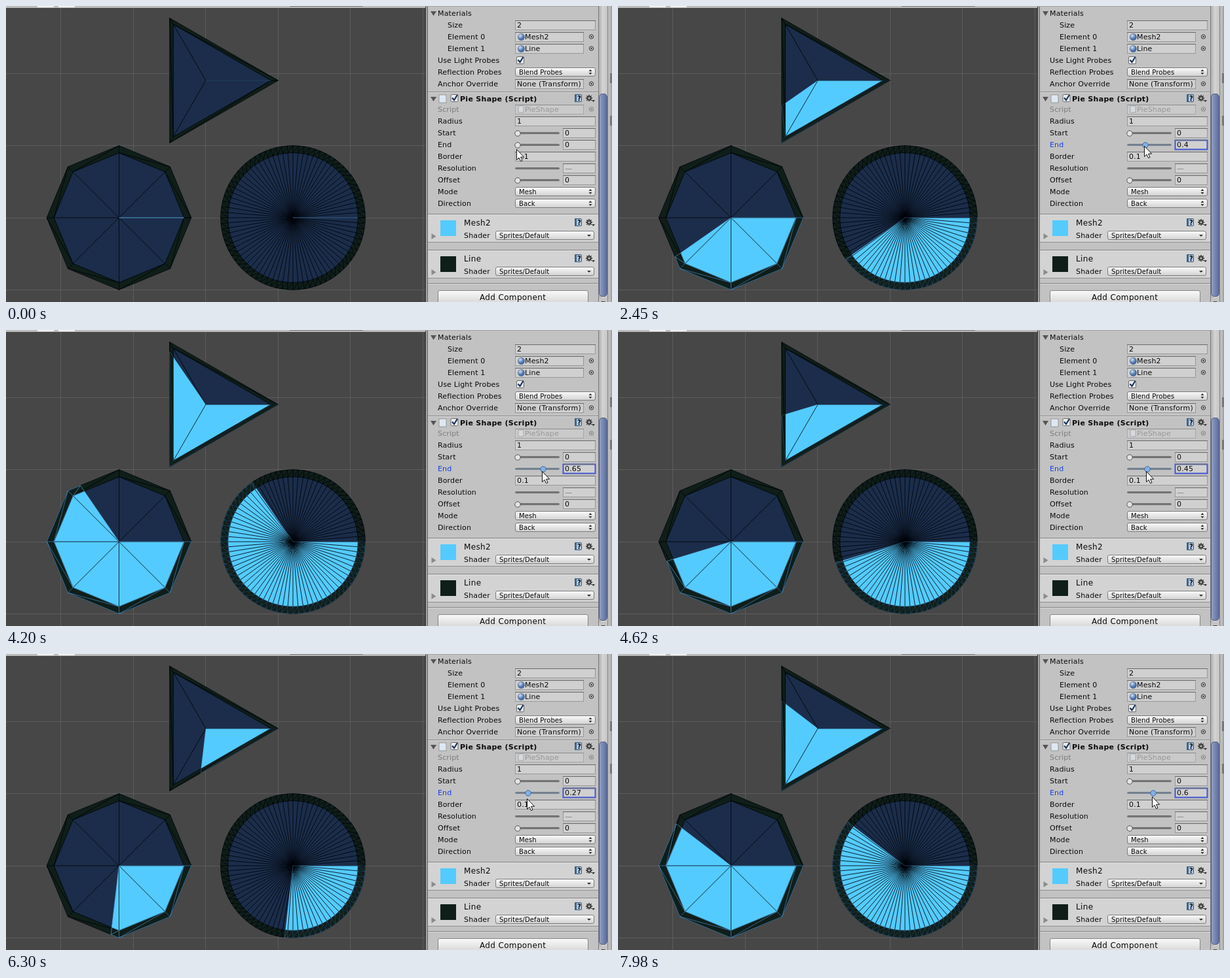
These frames come from a looping animation (925 by 453 pixels, 8 s). An HTML page with a canvas:

```html
<!DOCTYPE html>
<html lang="en">
<head>
<meta charset="utf-8">
<title>Pie shape inspector</title>
<style>
html, body { margin: 0; width: 100%; height: 100%; overflow: hidden; background: #c2c2c2; }
canvas, svg { position: absolute; left: 0; top: 0; display: block; }
text { font: 11px "DejaVu Sans", sans-serif; letter-spacing: .15px; fill: #0a0a0a; white-space: pre; }
.big { font-size: 12px; letter-spacing: .35px; }
.small { font-size: 10px; letter-spacing: .1px; }
.bold { font-weight: bold; letter-spacing: .3px; }
.dim { fill: #7c7c7c; }
</style>
</head>
<body>
<canvas id="view" width="641" height="453"></canvas>
<svg id="ui" width="925" height="453" viewBox="0 0 925 453">
  <defs>
    <linearGradient id="pop" x2="0" y2="1"><stop stop-color="#fafafa"/><stop offset="1" stop-color="#d2d2d2"/></linearGradient>
    <linearGradient id="thumb"><stop stop-color="#94a3c8"/><stop offset=".5" stop-color="#7585b0"/><stop offset="1" stop-color="#5d6c98"/></linearGradient>
    <linearGradient id="track"><stop stop-color="#a8a8a8"/><stop offset=".5" stop-color="#d4d4d4"/><stop offset="1" stop-color="#c4c4c4"/></linearGradient>
    <radialGradient id="ball" cx=".35" cy=".3"><stop stop-color="#d4e4fa"/><stop offset="1" stop-color="#4b70a6"/></radialGradient>
  </defs>
  <g id="panel"></g>
  <path id="pointer" d="M.5 .5V16.5L4 13.2L6.6 18.6L9 17.6L6.6 12.2H11.6Z" fill="#fff" stroke="#111"/>
</svg>
<script>
const LOOP = 8000, STEP = 70, TAU = Math.PI * 2;
const LIT = '#54cbff', FILL = '#1b2d4a', EDGE = '#0f1e19';
const TRAVEL = 59.6; // slider length in pixels

// start time, pointer y, then slider pixels, one per step
const runs = [
  [0, 219, 0], [70, 217, 0], [210, 216, 0], [560, 215, 0],
  [980, 215, 0, 1],
  [1260, 215, 2, 2, 3],
  [1540, 215, 4, 6, 7, 9, 10, 12, 13, 15, 16, 18, 19, 20],
  [2380, 214, 22, 24, 27, 30, 33, 36, 39, 42, 44, 46, 47],
  [3430, 215, 46, 45, 44, 43, 42, 41, 41],
  [4200, 216, 39, 37, 35, 33, 31, 29, 27, 25, 23, 21, 20, 19],
  [5040, 218, 18, 17, 15, 14, 12, 11, 10],
  [5950, 221, 11, 12, 13, 14, 15, 16, 17, 18, 20, 21],
  [6720, 220, 22, 24, 25, 27, 28],
  [7140, 220, 29],
  [7350, 219, 31, 32, 33],
  [7980, 218, 36]
];

const shapes = [
  { x: 305, y: 114, sides: 3, wire: .2 },
  { x: 172.5, y: 324, sides: 8, wire: .6 },
  { x: 438, y: 324, sides: 80, wire: .3 }
];
const RADIUS = 110.3, INNER = .9;

/* ---------- viewport ---------- */
const g = document.getElementById('view').getContext('2d');

function rim(s, f, scale) {
  const seg = TAU / s.sides, a = f * TAU;
  const off = a - Math.floor(a / seg + 1e-9) * seg - seg / 2;
  const r = RADIUS * scale * Math.cos(seg / 2) / Math.cos(off);
  return [s.x + r * Math.cos(a), s.y + r * Math.sin(a)];
}

// corner fractions from 0 up to the end, closing on a partial segment
function corners(s, end) {
  const list = [];
  for (let i = 0; i / s.sides < end - 1e-9; i++) list.push(i / s.sides);
  list.push(end);
  return list;
}

function poly(points, color) {
  g.beginPath();
  points.forEach(p => g.lineTo(...p));
  g.closePath();
  g.fillStyle = color;
  g.fill();
}

function line(...points) {
  points.forEach((p, i) => i ? g.lineTo(...p) : g.moveTo(...p));
}

function stroke(color) {
  g.strokeStyle = color;
  g.lineWidth = 1;
  g.stroke();
}

// the border strip, two triangles per segment
function strip(s, list, color) {
  g.beginPath();
  list.forEach((f, i) => {
    const a = rim(s, f, INNER), b = rim(s, f, 1);
    line(a, b);
    if (i + 1 < list.length) {
      const n = list[i + 1], d = rim(s, n, 1);
      line(rim(s, n, INNER), a, d, b);
    }
  });
  stroke(color);
}

function spokes(s, list, color) {
  g.beginPath();
  list.forEach(f => line([s.x, s.y], rim(s, f, INNER)));
  stroke(color);
}

function pie(s, end) {
  const all = corners(s, 1), part = corners(s, end), blue = `rgba(95,175,235,${s.wire})`;
  poly(all.map(f => rim(s, f, 1)), EDGE);
  poly(all.map(f => rim(s, f, INNER)), FILL);
  if (end > 0) poly([[s.x, s.y], ...part.map(f => rim(s, f, INNER))], LIT);
  strip(s, all, 'rgba(0,4,10,.85)');
  spokes(s, all.slice(1), 'rgba(0,4,10,.85)');
  if (end > 0) {
    strip(s, part, blue);
    spokes(s, part, `rgba(95,175,235,${s.wire / s.sides})`);
  }
  spokes(s, [0, end], blue);
}

function drawView(end) {
  g.fillStyle = '#474747';
  g.fillRect(0, 0, 641, 453);
  g.fillStyle = '#5c5c5c';
  for (let i = 0; i < 6; i++) g.fillRect(Math.round(83 + i * 110.6), 3, 1, 450);
  for (let i = 0; i < 4; i++) g.fillRect(0, Math.round(102.5 + i * 110.5), 641, 1);
  g.fillStyle = '#bcbcbc';
  g.fillRect(0, 0, 641, 3);
  g.fillStyle = '#f0f0f0';
  g.fillRect(48, 0, 25, 2);
  g.fillRect(80, 0, 25, 2);
  g.fillStyle = '#777';
  g.fillRect(433, 0, 112, 1);
  shapes.forEach(s => pie(s, end));
}

/* ---------- inspector ---------- */
const rect = (x, y, w, h, fill, more = '') =>
  `<rect x="${x}" y="${y}" width="${w}" height="${h}" fill="${fill}" ${more}/>`;
const path = (d, fill, more = '') => `<path d="${d}" fill="${fill}" ${more}/>`;
const text = (x, mid, str, cls = '', id = '') =>
  `<text x="${x}" y="${mid + 4}" class="${cls}" id="${id}">${str}</text>`;
const circle = (x, y, r, fill, more = '') =>
  `<circle cx="${x}" cy="${y}" r="${r}" fill="${fill}" ${more}/>`;

function field(x, mid, w, str, cls = '', pad = 3, id = '') {
  return rect(x + .5, mid - 6.5, w - 1, 14, '#d0d0d0', `stroke="#989898" id="${id && id + 'Box'}"`) +
    rect(x, mid - 7, w, 1, '#686868') + text(x + pad, mid, str, cls, id);
}

function picker(mid, ink) {
  return circle(893.5, mid, 3.2, 'none', `stroke="${ink}"`) + circle(893.5, mid, 1.2, ink);
}

function object(mid, str, ball) {
  return field(777, mid, 105, str, '', ball ? 15 : 3) + picker(mid, '#333') +
    (ball ? circle(786.5, mid + .5, 5.2, 'url(#ball)', 'stroke="#556b8c" stroke-width=".6"') : '');
}

function slider(mid, str, id = '') {
  return rect(777.5, mid - .5, 67, 2, '#858585', `rx="1" stroke="#555" stroke-width=".8" id="${id && id + 'Bar'}"`) +
    (str === '—' ? '' : circle(781, mid + 1, 4.2, '#e4e4e4', `stroke="#555" id="${id && id + 'Knob'}"`)) +
    field(850, mid, 50, str, str === '—' ? 'dim' : '', 3, id);
}

function popup(x, mid, w, str, both) {
  const r = x + w - 8;
  return rect(x + .5, mid - 6.5, w - 1, 13, 'url(#pop)', 'rx="2.5" stroke="#7c7c7c"') +
    text(x + 6, mid - .5, str, 'small') +
    (both ? path(`M${r - 2.5} ${mid - 1}h5l-2.5-3zM${r - 2.5} ${mid + 1}h5l-2.5 3z`, '#333')
          : path(`M${r - 3} ${mid - 1}h6l-3 3z`, '#333'));
}

function check(x, y) {
  return rect(x - 5.5, y - 5.5, 11, 11, '#ececec', 'rx="1.5" stroke="#6c6c6c"') +
    path(`M${x - 3.5} ${y - .5}l3 3.5L${x + 4.5} ${y - 5}`, 'none', 'stroke="#16335e" stroke-width="2.2"');
}

function tools(y) {
  let teeth = '';
  for (let i = 0; i < 4; i++)
    teeth += path(`M885 ${y}h10`, 'none', `stroke="#3a3a3a" stroke-width="1.8" transform="rotate(${i * 45} 890 ${y})"`);
  return rect(868.5, y - 5.5, 10, 11, '#b4c8de', 'rx="1" stroke="#35506f"') +
    rect(868, y - 6, 3, 12, '#3d668f') + text(872, y - .5, '?', 'small bold') +
    teeth + circle(890, y, 3.3, '#3a3a3a') + circle(890, y, 1.5, '#c8c8c8') +
    path(`M894 ${y + 3}h5l-2.5 3z`, '#333');
}

const arrow = (mid, ink = '#555') => path(`M648 ${mid - 3}h9l-4.5 7z`, ink);

function material(y, name, color) {
  return rect(644, y, 261, 42, '#d3d3d3') + rect(644, y - 2, 261, 1, '#858585') +
    rect(644, y - 1, 261, 1, '#dedede') + rect(644, y + 41, 261, 1, '#8f8f8f') +
    rect(663, y + 8, 24, 24, color) +
    path(`M649.5 ${y + 28}v9l7-4.5z`, '#8b8b8b') +
    text(699, y + 11.5, name, 'big') + text(699, y + 31, 'Shader') +
    tools(y + 11) + popup(747, y + 31, 151, 'Sprites/Default', false);
}

const labels = [
  [29, 'Size', 674], [47, 'Element 0', 674], [65, 'Element 1', 674], [83, 'Use Light Probes'],
  [101, 'Reflection Probes'], [119, 'Anchor Override'], [176, 'Radius'], [194, 'Start'],
  [230, 'Border'], [248, 'Resolution'], [266, 'Offset'], [284, 'Mode'], [302, 'Direction']
];

document.getElementById('panel').innerHTML = [
  rect(640, 0, 285, 453, '#c2c2c2'), rect(640, 0, 1, 453, '#3a3a3a'),
  rect(641, 0, 2, 453, '#a2a2a2'), rect(643, 0, 1, 453, '#686868'),
  rect(640, 0, 285, 1, '#a4a4a4'),
  arrow(11), text(659, 11, 'Materials'),
  ...labels.map(([mid, str, x = 659]) => text(x, mid, str)),
  field(777, 29, 123, '2'), object(47, 'Mesh2', true), object(65, 'Line', true),
  check(785, 83), popup(777, 101, 123, 'Blend Probes', true), object(119, 'None (Transform)'),
  rect(644, 131, 261, 1, '#8b8b8b'), rect(644, 132, 261, 1, '#dadada'),
  arrow(142), rect(661, 136, 11, 12, '#dfe8f2', 'stroke="#888" stroke-width=".8"'),
  check(684.5, 141), text(693, 142, 'Pie Shape (Script)', 'bold'), tools(141),
  text(659, 158, 'Script', 'dim'),
  '<g opacity=".6">', field(777, 158, 105, 'PieShape', 'dim', 15), picker(158, '#555'),
  rect(782, 153, 8, 10, '#e4eaf2', 'stroke="#888" stroke-width=".8"'), '</g>',
  field(777, 176, 123, '1'), slider(194, '0'),
  text(659, 212, 'End', '', 'label'), slider(212, '0', 'end'),
  field(777, 230, 123, '0.1'), slider(248, '—'), slider(266, '0'),
  popup(777, 284, 123, 'Mesh', true), popup(777, 302, 123, 'Back', true),
  material(320, 'Mesh2', LIT), material(375, 'Line', EDGE),
  rect(644, 424, 261, 1, '#858585'), rect(644, 425, 261, 1, '#d8d8d8'),
  rect(659.5, 435.5, 229, 22, 'url(#pop)', 'rx="2.5" stroke="#858585"'),
  text(723, 445.5, 'Add Component', 'big'),
  rect(904, 0, 14, 453, 'url(#track)'), rect(904, 0, 1, 453, '#7c7c7c'),
  rect(905.5, 134.5, 12, 310, 'url(#thumb)', 'rx="5" stroke="#4c5a84"'),
  rect(905, 447, 13, 6, '#c4c4c4'), path('M908 452h7l-3.5 3z', '#444'),
  rect(918, 0, 1, 453, '#858585'), rect(919, 0, 4, 453, '#bcbcbc'),
  rect(923, 0, 2, 453, '#a2a2a2'), rect(922, 103, 3, 15, '#777'), rect(922, 168, 3, 15, '#777')
].join('');

/* ---------- motion ---------- */
const byId = id => document.getElementById(id);
const [label, value, box, knob, bar, pointer] =
  ['label', 'end', 'endBox', 'endKnob', 'endBar', 'pointer'].map(byId);

function stateAt(t) {
  const [start, y, ...pixels] = runs.filter(r => r[0] <= t).pop();
  const i = Math.min(Math.floor((t - start) / STEP), pixels.length - 1);
  return { px: pixels[i], y, focus: t >= 980 };
}

let shown = '';
function frame(now) {
  const { px, y, focus } = stateAt(now % LOOP);
  const key = [px, y, focus].join();
  if (key !== shown) {
    shown = key;
    drawView(px / TRAVEL);
    value.textContent = Number((px / TRAVEL).toFixed(2));
    label.style.fill = focus ? '#153ce0' : '';
    box.setAttribute('stroke', focus ? '#4457cc' : '#989898');
    box.setAttribute('stroke-width', focus ? 2 : 1);
    knob.setAttribute('cx', 781 + px);
    knob.setAttribute('fill', focus ? '#86b2e2' : '#e4e4e4');
    knob.setAttribute('stroke', focus ? '#3c69ac' : '#555');
    bar.setAttribute('stroke', focus ? '#56718f' : '#555');
    pointer.setAttribute('transform', `translate(${779 + px} ${y})`);
  }
  requestAnimationFrame(frame);
}
frame(performance.now());
</script>
</body>
</html>
```
